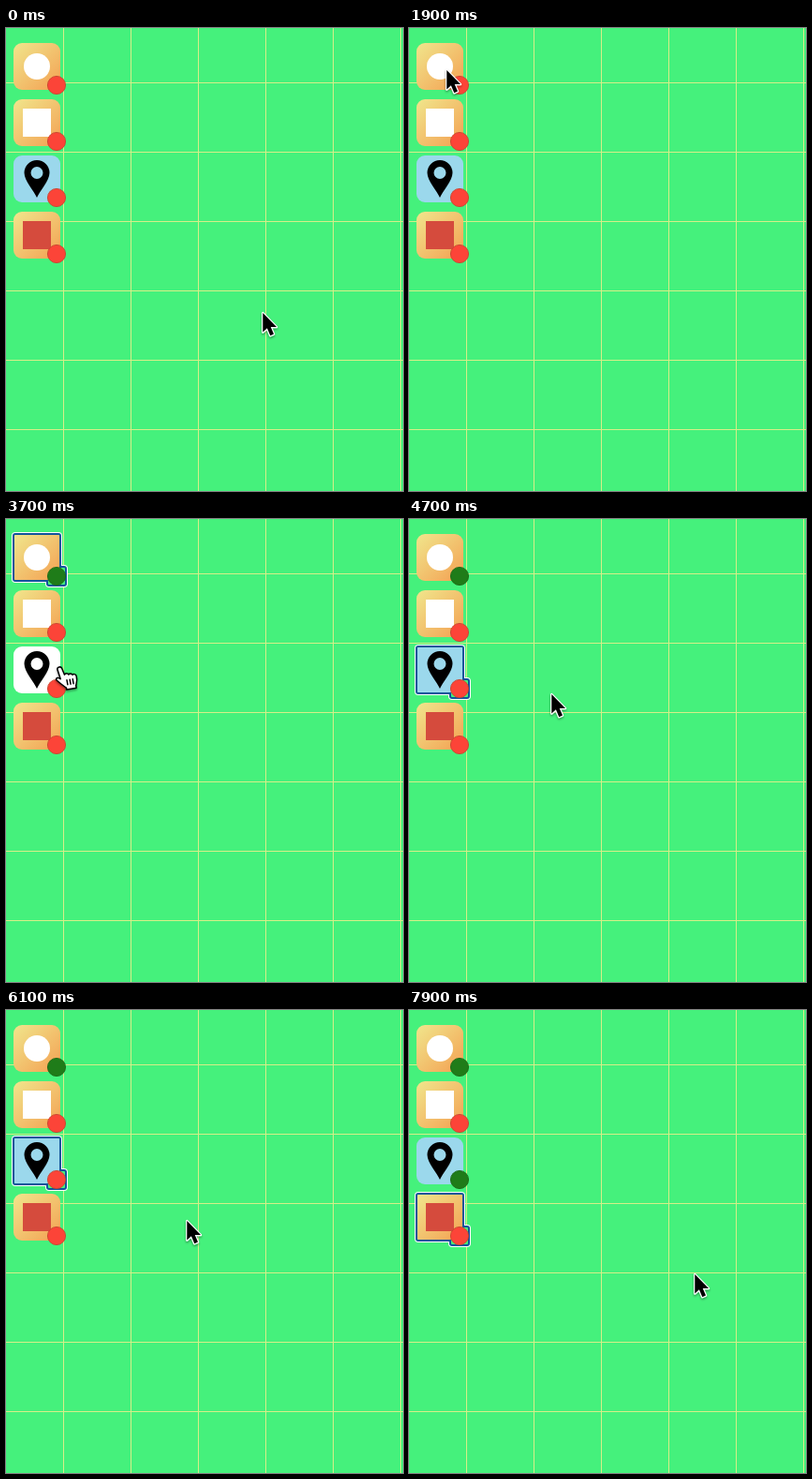
An HTML page for the animation above (8 s loop, 424x494 px).

```html
<!DOCTYPE html>
<html lang="en">
<head>
<meta charset="utf-8">
<title>Icon shortcuts</title>
<style>
  html, body { margin: 0; width: 100%; height: 100%; overflow: hidden; background: #45f17c; }
  svg { display: block; width: 424px; height: 494px; }
</style>
</head>
<body>
<svg viewBox="0 0 424 494">
  <defs>
    <linearGradient id="warm" x1="0" y1="0" x2="1" y2="1">
      <stop offset="0" stop-color="#f0e68c"/>
      <stop offset="1" stop-color="#f4a052"/>
    </linearGradient>
    <filter id="shade" x="-50%" y="-50%" width="200%" height="200%">
      <feDropShadow dx="0" dy="1.5" stdDeviation="1" flood-opacity=".4"/>
    </filter>
  </defs>
  <path id="grid" stroke="#d6ef88" fill="none"/>
  <g id="icons"></g>
  <g id="cursor" filter="url(#shade)" stroke-linejoin="round">
    <path id="arrow" d="M1.3 2V22.6L5.9 18.3L9.3 26.2L13 24.6L9.7 17H16Z"
      fill="#000" stroke="#fff" stroke-width="2.4" paint-order="stroke"/>
    <g id="hand" transform="rotate(-10)" stroke="#000" stroke-width="1.5" stroke-linecap="round">
      <path fill="#fff" d="M-2.5 2.2C-2.5-.8 2-.8 2.4 2L4 9C5 7.5 8 7.8 8.3 9.6C9.5 8.3 12 9 12.3 10.5
        C13.5 9.6 16 10.3 16.2 12.5C16.8 17 15 20 14 22.5V25H3.5V23C0 20-3 16-5.6 13C-6 10.8-3 10-1 12.8Z"/>
      <path fill="none" d="M5.5 15V20M8.7 15V20M11.8 15V20"/>
    </g>
  </g>
</svg>
<script>
const LOOP = 8000, STEP = 100, SIZE = 50, PITCH = 60, LEFT = 8, TOP = 16;
const PAGE = '#45f17c';
const byId = id => document.getElementById(id);

// Where the pointer rests or turns: time, x, y
const stops = [
  [0, 273, 302], [800, 130, 76], [1900, 39, 43], [2900, 109, 68], [3700, 57, 158],
  [4700, 151, 185], [6100, 192, 223], [6900, 43, 225], [7900, 304, 280]
];

// Each icon takes focus when clicked and turns green once done
const icons = [
  { focus: 2300, blur: 3900, done: 2500,
    art: '<circle cx="25" cy="25" r="14" fill="#fff"/>' },
  { art: '<rect x="10" y="10" width="30" height="30" fill="#fff"/>' },
  { focus: 3900, blur: 6900, done: 6700, pin: true, hot: true,
    art: '<path fill-rule="evenodd" d="M25 45C22 38 11.5 27 11.5 18.5a13.5 13.5 0 0 1 27 0C38.5 27 28 38 25 45Z' +
         'M25 12a6.5 6.5 0 1 0 0 13a6.5 6.5 0 0 0 0-13Z"/>' },
  { focus: 6900, blur: LOOP, hot: true,
    art: '<rect x="10" y="10" width="30" height="30" fill="#d54b3d"/>' }
];

const box = (pos, size, grow, fill) =>
  `<rect x="${pos - grow}" y="${pos - grow}" width="${size + 2 * grow}" height="${size + 2 * grow}"
     rx="${2 + grow}" fill="${fill}"/>`;

// Tile and badge boxes together, grown on every side
const slab = (grow, fill) =>
  box(0, SIZE, grow, fill) +
  `<g transform="translate(1 0)">${box(35, 20, grow, fill)}</g>`;

byId('grid').setAttribute('d', Array.from({ length: 6 }, (_, i) =>
  `M${61.5 + 72 * i} 0V494M0 ${58.5 + 74 * i}H424`).join(''));

icons.forEach((icon, i) => {
  const g = document.createElementNS('http://www.w3.org/2000/svg', 'g');
  g.setAttribute('transform', `translate(${LEFT} ${TOP + PITCH * i})`);
  g.innerHTML =
    `<g class="ring">${slab(2, '#fff')}${slab(1, '#10549b')}${slab(-1, PAGE)}</g>
     <rect class="tile"/>${icon.art}
     <circle class="badge" cx="46" cy="45" r="9.6" stroke-width=".9"/>`;
  byId('icons').append(g);
  for (const part of ['tile', 'ring', 'badge']) icon[part] = g.querySelector('.' + part);
});

const set = (el, attrs) => {
  for (const name in attrs) el.setAttribute(name, attrs[name]);
};
const show = (el, on) => set(el, { visibility: on ? 'visible' : 'hidden' });

function pointerAt(t) {
  const i = Math.max(1, stops.findIndex(s => s[0] >= t));
  const [t0, x0, y0] = stops[i - 1], [t1, x1, y1] = stops[i];
  const k = (t - t0) / (t1 - t0);
  const e = k * k * (3 - 2 * k);
  return [x0 + (x1 - x0) * e, y0 + (y1 - y0) * e];
}

function draw(t) {
  const [x, y] = pointerAt(t);
  let hand = false;
  icons.forEach((icon, i) => {
    const dx = x - LEFT, dy = y - TOP - PITCH * i;
    const over = icon.hot && dx >= 0 && dx < SIZE && dy >= 0 && dy < SIZE;
    const focused = t >= icon.focus && t < icon.blur;
    const done = t >= icon.done;
    const inset = focused ? 1 : 0;
    hand = hand || over;
    set(icon.tile, {
      x: inset, y: inset, width: SIZE - 2 * inset, height: SIZE - 2 * inset,
      rx: focused ? 1 : 9,
      fill: icon.pin ? (over ? '#fff' : '#9bd8ec') : 'url(#warm)'
    });
    set(icon.badge, done
      ? { fill: '#1f7c19', stroke: '#1b6816' }
      : { fill: '#fc4438', stroke: '#c9452f' });
    show(icon.ring, focused);
  });
  set(byId('cursor'), { transform: `translate(${x.toFixed(1)} ${y.toFixed(1)})` });
  show(byId('arrow'), !hand);
  show(byId('hand'), hand);
}

const start = performance.now();
function tick() {
  const t = (performance.now() - start) % LOOP;
  draw(Math.floor(t / STEP) * STEP);
  requestAnimationFrame(tick);
}
tick();
</script>
</body>
</html>
```
